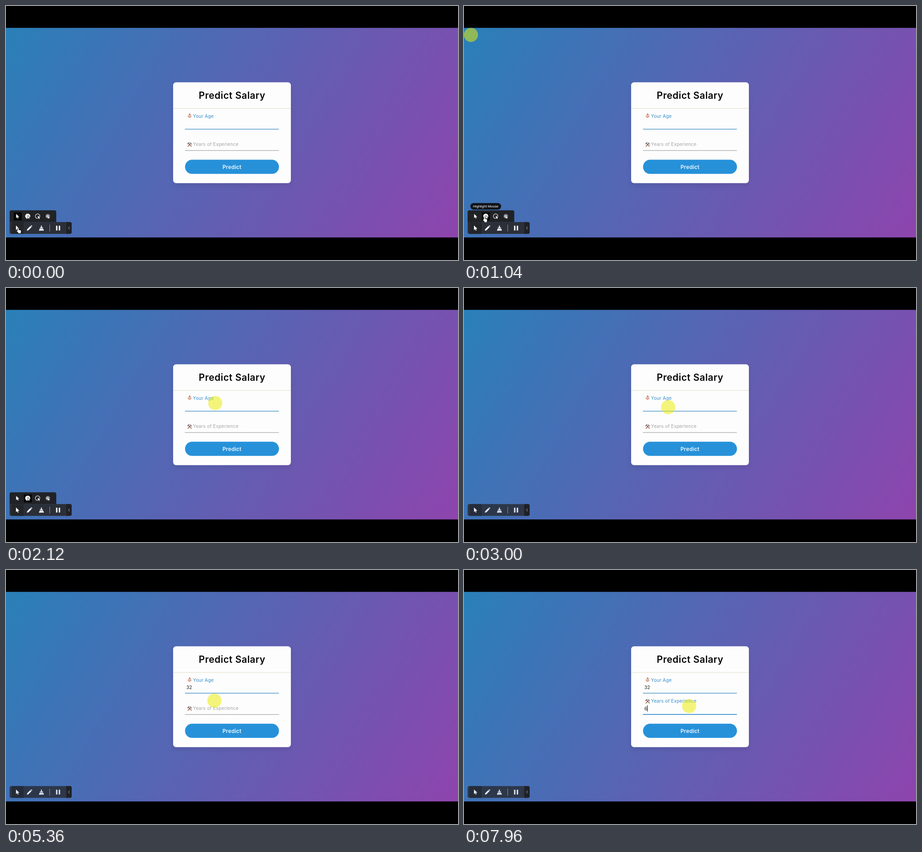
An HTML page with a canvas that plays this animation: 998 by 561 pixels, repeating every 8000 ms.

```html
<!DOCTYPE html>
<html lang="en">
<head>
<meta charset="utf-8">
<title>Predict Salary</title>
<style>
html, body { margin: 0; width: 100%; height: 100%; overflow: hidden; background: #000; }
canvas { display: block; width: 100vw; height: 100vh; }
</style>
</head>
<body>
<canvas id="stage" width="998" height="561"></canvas>
<script>
const ctx = document.getElementById('stage').getContext('2d');
const LOOP = 8000;
const BLUE = [38, 145, 217], GREY = [164, 164, 168];
const LABEL_BLUE = [52, 142, 203];
const FONT = 'Inter, "Open Sans", sans-serif';
// Moments of the interaction, in ms
const HAND_OUT = 1400, PANEL_OUT = 2900, FOCUS_AGE = 2350, PREVIEW = 3500,
  PICKED = 4600, FOCUS_YEARS = 6550, TYPED = 7600;

const clamp = v => Math.min(1, Math.max(0, v));
const lerp = (a, b, k) => a + (b - a) * k;
const ramp = (t, a, b) => clamp((t - a) / (b - a));
const smooth = k => k * k * (3 - 2 * k);
const rgb = c => `rgb(${c.map(Math.round).join()})`;
const mix = (a, b, k) => rgb(a.map((v, i) => lerp(v, b[i], k)));
const blink = (t, from) => t >= from && (t - from) % 1000 < 500;

// CSS "ease", cubic-bezier(.25, .1, .25, 1)
function ease(x) {
  const bez = (a, b, s) => 3 * a * s * (1 - s) ** 2 + 3 * b * s * s * (1 - s) + s ** 3;
  let lo = 0, hi = 1;
  for (let i = 0; i < 20; i++) {
    const mid = (lo + hi) / 2;
    if (bez(.25, .25, mid) < x) lo = mid; else hi = mid;
  }
  return bez(.1, 1, lo);
}

// Position along timed points [ms, x, y]
function along(points, t) {
  let i = 1;
  while (i < points.length - 1 && t > points[i][0]) i++;
  const [a, b] = [points[i - 1], points[i]];
  const k = smooth(ramp(t, a[0], b[0]));
  return [lerp(a[1], b[1], k), lerp(a[2], b[2], k)];
}

function rect(x, y, w, h, color) {
  ctx.fillStyle = color;
  ctx.fillRect(x, y, w, h);
}

function box(x, y, w, h, r, color) {
  ctx.beginPath();
  ctx.roundRect(x, y, w, h, r);
  ctx.fillStyle = color;
  ctx.fill();
}

function disc(x, y, r, color) {
  ctx.beginPath();
  ctx.arc(x, y, r, 0, 7);
  ctx.fillStyle = color;
  ctx.fill();
}

function text(str, x, y, font, color, align = 'left', spacing = 0) {
  ctx.font = font;
  ctx.letterSpacing = spacing + 'px';
  ctx.fillStyle = color;
  ctx.textAlign = align;
  ctx.fillText(str, x, y);
}

function shape(d, x, y, fill, line, width = 1, scale = 1) {
  const p = new Path2D(d);
  ctx.save();
  ctx.translate(x, y);
  ctx.scale(scale, scale);
  ctx.lineJoin = ctx.lineCap = 'round';
  if (line) { ctx.lineWidth = width; ctx.strokeStyle = line; ctx.stroke(p); }
  if (fill) { ctx.fillStyle = fill; ctx.fill(p); }
  ctx.restore();
}

const ARROW = 'M0 0V10.2L2.5 7.9L4.1 11.4L5.8 10.6L4.2 7.2H7.6Z';
const HAND = 'M1.5 1.2Q2.6 -.2 3.5 1.2V5L8 6Q9.5 6.4 9.3 8L8.6 11.5V13H3V11.5L-.8 7.8Q-.7 6 1.5 7.2Z';

function backdrop() {
  rect(0, 0, 998, 561, '#000');
  const g = ctx.createLinearGradient(24.5, 5.6, 973.5, 553.4);
  g.addColorStop(0, '#2980b9');
  g.addColorStop(1, '#8e44ad');
  rect(0, 48.3, 998, 462.9, g);
}

function baby(x, y) {
  disc(x, y + .6, 4.4, '#f4d3c4');
  disc(x - 4, y + 1, 1.1, '#edbcaa');
  disc(x + 4, y + 1, 1.1, '#edbcaa');
  shape('M-.8 -4.5Q2 -5 1 -2.4Q-.3 -1.8 -.4 -3', x, y, null, '#a3523c', 1.1);
  disc(x - 1.7, y + .8, .7, '#553a35');
  disc(x + 1.7, y + .8, .7, '#553a35');
  shape('M-1.4 3Q0 4 1.4 3', x, y, null, '#c34f45', .9);
}

function tools(x, y) {
  shape('M-3.8 4L3 -3M3.8 4L-3 -3', x, y, null, '#8c5542', 1.5);
  shape('M-4.4 -1.6L-1.6 -4.2', x, y, null, '#777b86', 2);
  shape('M.6 -4.1Q3.7 -3.7 4.4 .2', x, y, null, '#7d818b', 1.3);
}

function caret(x, y) {
  rect(x, y, 1.2, 14, '#222');
}

function card(t) {
  ctx.save();
  ctx.shadowColor = 'rgba(0,0,0,.09)';
  ctx.shadowBlur = 11;
  ctx.shadowOffsetY = 5;
  box(369, 168.5, 260, 222.7, 6.5, '#fdfdfd');
  ctx.restore();
  text('Predict Salary', 499.2, 204.8, `600 20.8px ${FONT}`, '#050505', 'center', .5);
  rect(369, 225.6, 260, 1, '#dfdcc6');

  const value = `400 10.2px ${FONT}`, label = `400 10.2px ${FONT}`;
  const preview = t >= PREVIEW && t < PICKED;
  if (preview) rect(395, 245.5, 207.5, 26, '#e8f0fe');
  rect(395, 271.4, 207.5, 1.3, '#3a8cc2');
  baby(405.3, 242.6);
  text('Your Age', 412.8, 246.6, label, rgb(LABEL_BLUE), 'left', .2);
  if (preview) text('32', 398.3, 262.4, '9px "Liberation Sans", Arial, sans-serif', '#111');
  if (t >= PICKED) text('32', 398.3, 262.7, value, '#222');
  if (t < PREVIEW && blink(t, FOCUS_AGE)) caret(398, 252);
  if (t < FOCUS_YEARS && blink(t, PICKED)) caret(411, 252);

  const k = ease(ramp(t, FOCUS_YEARS, FOCUS_YEARS + 500));
  const y = lerp(305.6, 289.6, k);
  rect(395, 318.6, 207.5, 1.2, '#a3a3a1');
  rect(395, 318.2, 207.5 * k, 1.5, rgb(BLUE));
  tools(405.5, y + .4);
  text('Years of Experience', 412.8, y + 3.8, label, mix(GREY, LABEL_BLUE, k), 'left', .2);
  if (t >= TYPED) {
    text('6', 398.3, 309.6, value, '#222');
    if (blink(t, TYPED)) caret(404.4, 298.7);
  } else if (blink(t, FOCUS_YEARS)) caret(398, 298.7);

  box(395.3, 339.6, 207.4, 31.2, 15.6, rgb(BLUE));
  text('Predict', 499, 359.7, `600 11.7px ${FONT}`, '#f2f8fc', 'center', .25);
}

function toolbar(active) {
  const ink = active ? '#fff' : '#e2e9f4';
  box(8, 477.3, 137, 26, active ? [0, 4, 4, 4] : 4, active ? 'rgba(41,43,47,.93)' : 'rgba(41,45,54,.84)');
  rect(12.5, 477.3, 26.5, 26, active ? '#232529' : '#252c39');
  box(133, 477.3, 12, 26, [0, 4, 4, 0], '#1f2126');
  shape(ARROW, 22, 484.8, ink);
  shape('M-5.7 5.7L-5 2.4L2 -4.6L4.6 -2L-2.4 5ZM2.8 -5.3L3.8 -6.1Q4.4 -6.4 5 -5.9L6 -4.8Q6.3 -4.2 5.8 -3.7L5.3 -2.8Z',
    51.8, 490.6, ink);
  shape('M-1 -5.7H1V-1.4H3.5V.7H-3.5V-1.4H-1ZM-4.2 1.7H4.2L5.4 5.7H2.6V3.7L1.7 5.7H-.2V3.7L-1 5.7H-5.4Z', 78.2, 490.6, ink);
  rect(96, 483, 1, 15, '#9c9887');
  rect(110.5, 485.3, 3, 10.5, ink);
  rect(116.5, 485.3, 3, 10.5, ink);
  shape('M1.5 -2.6L-1.2 0L1.5 2.6', 138.8, 490.4, null, '#b8bcc4', 1);
}

function panel(t) {
  const chosen = t >= 900;
  box(8, 451.3, 103, 26, [4, 4, 0, 0], '#202226');
  if (!chosen) rect(17, 456, 18, 17.5, '#040404');
  if (chosen) rect(39.5, 456, 17.5, 17.5, '#040404');
  else if (t > 380) rect(39.5, 456, 17.5, 17.5, '#34363b');
  shape(ARROW, 22.4, 459.3, '#fff', null, 1, .9);
  disc(48, 464.2, 5.6, '#fff');
  shape(ARROW, 48.3, 463, '#fff', '#17181b', 2.4, .62);
  ctx.beginPath();
  ctx.arc(69.8, 464.2, 5, 0, 7);
  ctx.lineWidth = 1.2;
  ctx.strokeStyle = '#eee';
  ctx.stroke();
  shape(ARROW, 70.5, 463, '#fff', '#202226', 2.4, .65);
  const glow = ctx.createRadialGradient(92.3, 464.2, 2, 92.3, 464.2, 6);
  glow.addColorStop(0, '#dfe3ea');
  glow.addColorStop(1, 'rgba(160,170,185,0)');
  disc(92.3, 464.2, 6, glow);
  shape(ARROW, 92.3, 463, '#fff', '#202226', 1.8, .62);
}

function tooltip(t) {
  ctx.globalAlpha = ramp(t, 400, 540) * (1 - ramp(t, HAND_OUT, HAND_OUT + 120));
  box(14, 435.2, 68, 14.6, 7.3, '#111318');
  text('Highlight Mouse', 48, 445.3, '7.8px "Liberation Sans", Arial, sans-serif', '#fff', 'center');
  ctx.globalAlpha = 1;
}

function pointer(t) {
  if (t < HAND_OUT) {
    const [x, y] = along([[120, 24.5, 490], [400, 42.5, 465.5]], t);
    shape(HAND, x, y, '#fff', '#111', 1.4, .92);
  }
  let spot = null;
  if (t >= 920 && t < HAND_OUT) spot = [15.3, 63.8];
  else if (t >= HAND_OUT && t < PREVIEW - 100) {
    spot = along([[HAND_OUT, 60, 442], [2060, 462, 254], [2600, 462, 254], [3400, 440, 272]], t);
  } else if (t >= PICKED) {
    spot = along([[PICKED + 200, 440, 282], [6200, 497, 300.5]], t);
  }
  if (!spot) return;
  ctx.save();
  ctx.beginPath();
  ctx.rect(0, 48.3, 998, 462.9);
  ctx.clip();
  disc(spot[0], spot[1], 15.6, 'rgba(235,236,4,.53)');
  ctx.restore();
}

function draw(now) {
  const t = now % LOOP;
  const active = t < PANEL_OUT;
  backdrop();
  card(t);
  toolbar(active);
  if (active) {
    panel(t);
    tooltip(t);
  }
  pointer(t);
  requestAnimationFrame(draw);
}
requestAnimationFrame(draw);
</script>
</body>
</html>
```
